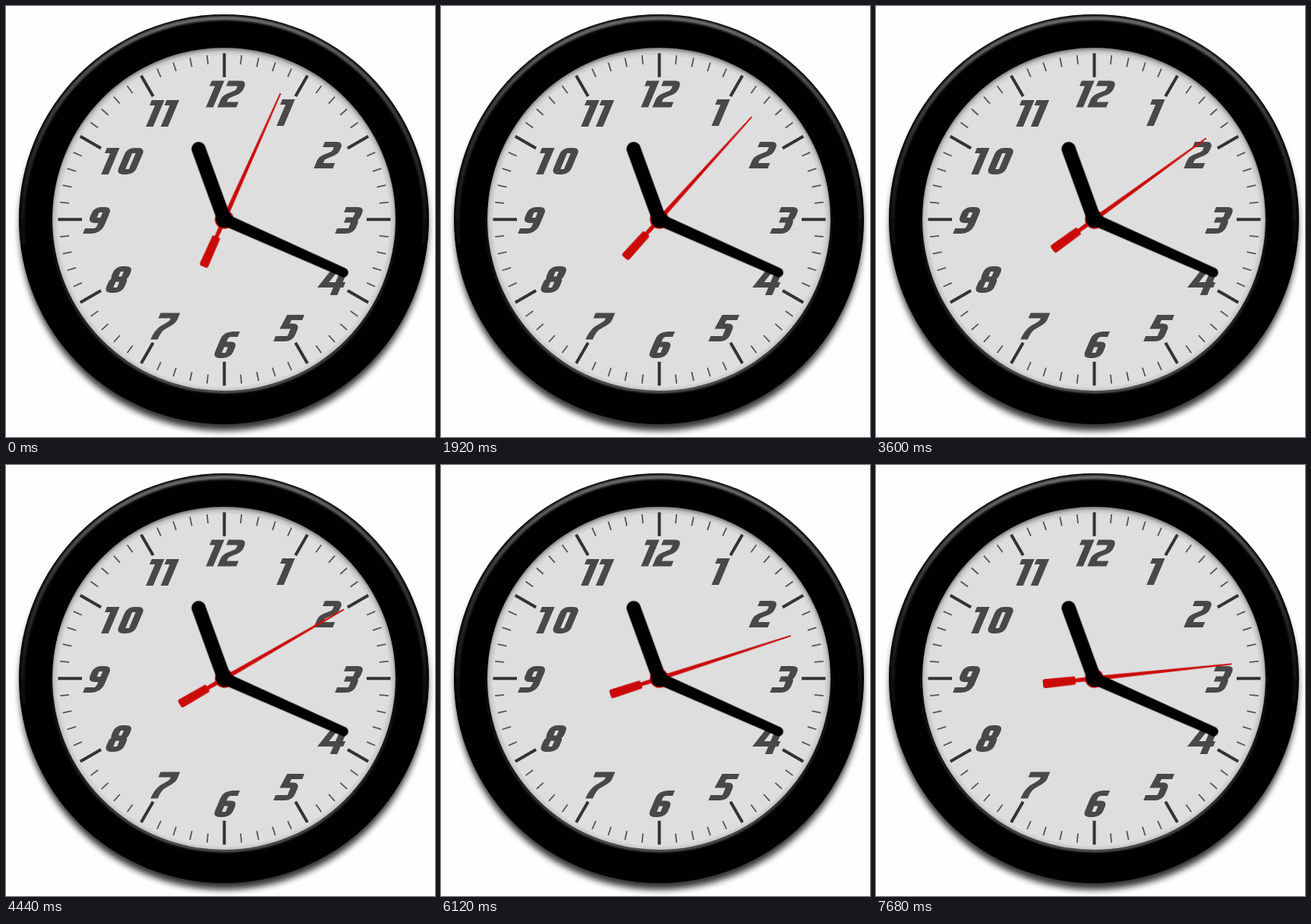
An HTML page for the animation above (8 s loop, 565x568 px).

```html
<!DOCTYPE html>
<html lang="en">
<head>
<meta charset="utf-8">
<title>Wall clock</title>
<style>
  html, body { margin: 0; width: 100%; height: 100%; overflow: hidden; background: #fefefe; }
  svg { display: block; width: 565px; height: 568px; }
  #numerals path { fill: none; stroke: #484848; stroke-width: 6.8; }
  #second { fill: #cc0909; transform-origin: 0 0; }
</style>
</head>
<body>
<svg viewBox="0 0 565 568" role="img" aria-label="Wall clock with numerals 1 to 12">
  <defs>
    <linearGradient id="rim" x1="0" y1="0" x2="0" y2="1">
      <stop offset="0" stop-color="#777"/>
      <stop offset=".25" stop-color="#3c3c3c"/>
      <stop offset=".6" stop-color="#000"/>
    </linearGradient>
    <linearGradient id="lip" x1="0" y1="0" x2="0" y2="1">
      <stop offset=".45" stop-color="#000"/>
      <stop offset=".8" stop-color="#333"/>
      <stop offset="1" stop-color="#777"/>
    </linearGradient>
    <radialGradient id="face" gradientUnits="userSpaceOnUse" cx="0" cy="2.5" r="228">
      <stop offset=".955" stop-color="#dedede"/>
      <stop offset=".98" stop-color="#c6c6c6"/>
      <stop offset="1" stop-color="#808080"/>
    </radialGradient>
    <filter id="soft" x="-5%" y="-5%" width="110%" height="110%"><feGaussianBlur stdDeviation="1.6"/></filter>
    <filter id="shadow" x="-10%" y="-10%" width="120%" height="120%"><feGaussianBlur stdDeviation="4"/></filter>
  </defs>

  <g transform="translate(287 281)">
    <circle cy="10" r="268.5" opacity=".8" filter="url(#shadow)"/>
    <circle r="270"/>
    <circle r="265" fill="none" stroke="url(#rim)" stroke-width="5" filter="url(#soft)"/>
    <circle r="227.5" fill="none" stroke="url(#lip)" stroke-width="3" filter="url(#soft)"/>
    <circle r="226" fill="url(#face)"/>
  </g>
  <g id="ticks" transform="translate(287.5 281.3)"></g>

  <g id="numerals"></g>

  <g transform="translate(287.5 281.3)">
    <g id="second">
      <path d="M-.9-182H.9L3 0 2.5 28H-2.5L-3 0Z"/>
      <path d="M-4.5 25H4.5Q5.5 25 5.5 27L6 65Q6 68 3 68H-3Q-6 68-6 65L-5.5 27Q-5.5 25-4.5 25Z"/>
      <circle r="12.5"/>
    </g>
    <path transform="rotate(-20)" d="M-9.3 0V-99A9.3 9.3 0 0 1 9.3-99V0Z"/>
    <path transform="rotate(114)" d="M-8 0L-6.2-172A6.2 6.2 0 0 1 6.2-172L8 0Z"/>
    <circle r="11"/>
  </g>
</svg>

<script>
const add = (parent, tag, attrs) => {
  const el = document.createElementNS('http://www.w3.org/2000/svg', tag);
  for (const key in attrs) el.setAttribute(key, attrs[key]);
  return document.getElementById(parent).appendChild(el);
};

for (let i = 0; i < 60; i++) {
  const hour = i % 5 === 0;
  add('ticks', 'path', {
    d: hour ? 'M0-219V-187.5' : 'M0-217.5V-205.5',
    stroke: hour ? '#333' : '#555',
    'stroke-width': hour ? 4 : 1.8,
    transform: `rotate(${i * 6})`
  });
}

// Upright centre lines; each numeral is then widened and slanted.
const glyphs = {
  0: 'M7 3.5H10.5Q13.6 3.5 13.6 7.5V27Q13.6 31.5 10 31.5H7Q3.5 31.5 3.5 27V8Q3.5 3.5 7 3.5Z',
  1: 'M-5 3.5H3.5V35',
  2: 'M0 3.5H11Q14 3.5 14 7.5V11Q14 15 10 17L7 19Q3.5 21 3.5 25V31.5H18',
  3: 'M0 3.5H11Q14 3.5 14 7V12Q14 16.5 11 17H4M11 17Q14 18 14 22V27Q14 31.5 10 31.5H0',
  4: 'M4 0L-2 22.5H18M12 9V36',
  5: 'M18.6 3.5H5.5L4.5 15H11Q14.5 15 14.5 19V27Q14.5 31.5 10.5 31.5H0',
  6: 'M15.4 3.5H9Q3.5 4 3.5 10V27Q3.5 31.5 7 31.5H10Q13.8 31.5 13.8 27V21Q13.8 17 11 17H4',
  7: 'M-1 3.5H14V9Q14 12 11 15L6.5 20Q3.5 24 3.5 35',
  8: 'M7.5 3.5H10.5Q13.8 3.5 13.8 7V12Q13.8 17 10 17H7.5Q4 17 4 12V8Q4 3.5 7.5 3.5Z' +
     'M7 17H10Q13.8 17 13.8 21V27Q13.8 31.5 10 31.5H7Q3.5 31.5 3.5 27V22Q3.5 17 7 17Z',
  9: 'M13 17.5H7Q3.5 17.5 3.5 13V8Q3.5 3.5 7 3.5H10Q13.6 3.5 13.6 8V25Q13 31.5 8 31.5H0'
};

// Top of each dial number, with the left position of every digit.
const numbers = [
  ['1', 123, 371], ['2', 179, 420], ['3', 265, 448], ['4', 345, 430],
  ['5', 407, 367], ['6', 429, 286.5], ['7', 404.5, 205], ['8', 343, 143.5],
  ['9', 265, 116], ['10', 187, 140, 159.5], ['11', 124, 199, 218.5], ['12', 98.5, 278, 293]
];
for (const [label, y, ...xs] of numbers) {
  xs.forEach((x, i) => add('numerals', 'path', {
    d: glyphs[label[i]],
    transform: `translate(${x} ${y}) skewX(-23) scale(1.4 1)`
  }));
}

const duration = 8000;
const ticksAt = [0, 200, 1040, 1920, 2760, 3600, 4440, 5320, 6120, 6840, 7680, duration];
const keyframes = ticksAt.map((time, i) => ({
  offset: time / duration,
  transform: `rotate(${24 + 6 * Math.min(i, 10)}deg)`,
  easing: 'step-end'
}));
document.getElementById('second').animate(keyframes, { duration, iterations: Infinity });
</script>
</body>
</html>
```
